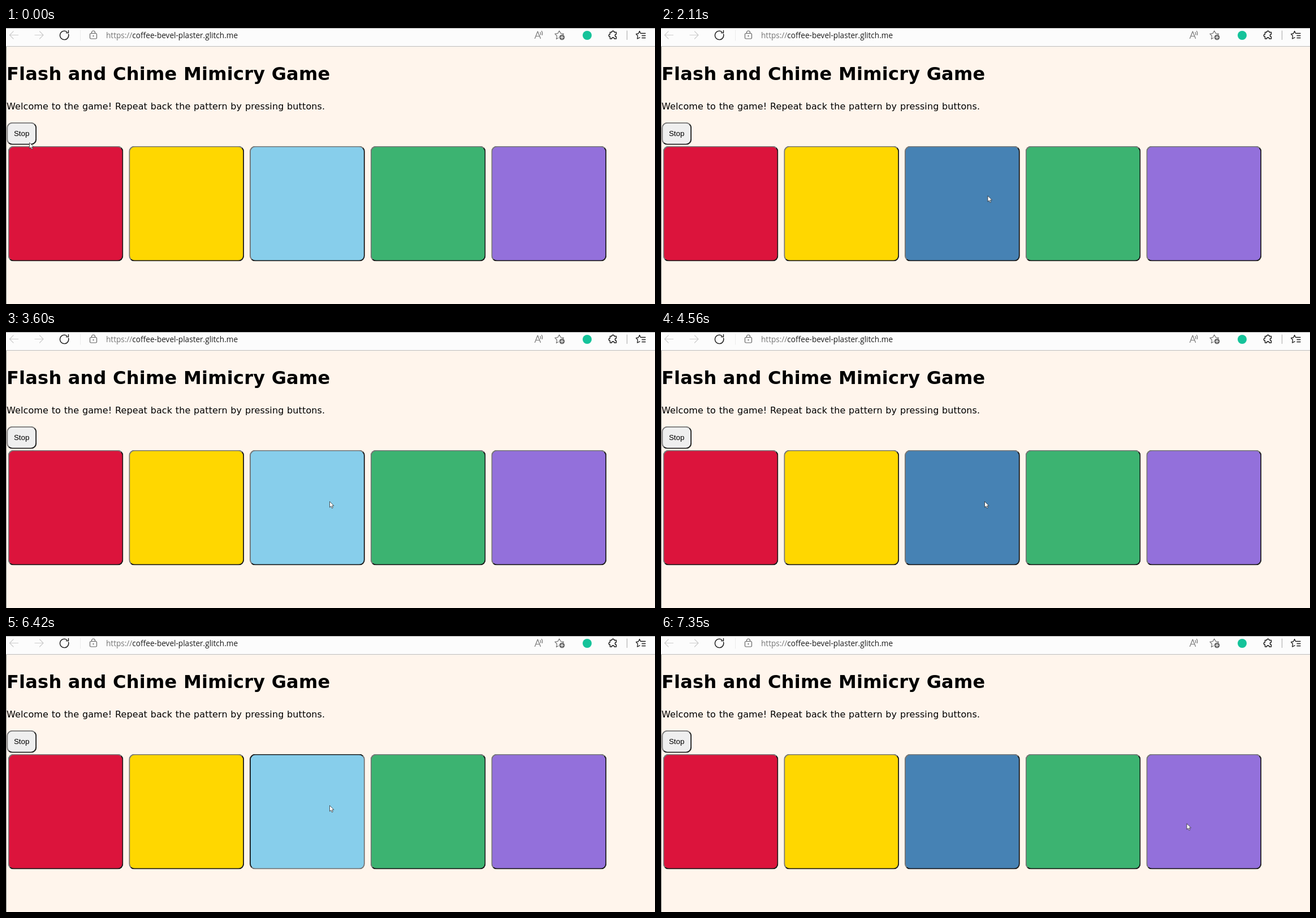
An HTML page for the animation above (8 s loop, 1148 by 488 pixels).

```html
<!DOCTYPE html>
<html lang="en">
<head>
<meta charset="utf-8">
<title>Flash and Chime Mimicry Game</title>
<style>
  html, body { margin: 0; width: 100%; height: 100%; overflow: hidden; }
  body { position: relative; background: #fff5ec; font-family: "DejaVu Sans", sans-serif; color: #000; }
  body > * { position: absolute; box-sizing: border-box; margin: 0; white-space: nowrap; }
  #edge { left: 0; top: 33px; width: 1px; height: 455px; background: #8c8a88; }
  #bar { left: 0; top: 0; }
  #url { left: 177px; top: 3px; font: 13.6px/20px "Open Sans", "Noto Sans", sans-serif; color: #1b1b1b; }
  #url span { color: #757575; }
  h1 { left: 1px; top: 61px; font-size: 32px; line-height: 40px; letter-spacing: .23px; }
  p { left: 1px; top: 129px; font-size: 16px; line-height: 20px; letter-spacing: .11px; word-spacing: .5px; }
  .key { border: 2px solid; border-color: #767676 #1c1c1c #1c1c1c #767676; border-radius: 10px; }
  #stop { left: 0; top: 0; width: 53px; height: 40px; transform: translate(1.2px, 166.7px); background: #efefef;
    text-align: center; font: 13.33px/36px "Liberation Sans", Arial, sans-serif; }
  .pad { left: 0; top: 0; width: 204px; height: 204px; }
  #cursor { left: 0; top: 0; }
</style>
</head>
<body>
<svg id="bar" width="1148" height="33" fill="none" stroke-linecap="round" stroke-linejoin="round">
  <path fill="#fcfcfc" d="M0 0H1148V33H0z"/>
  <path stroke="#a9a9a9" stroke-linecap="butt" d="M0 .5H1148"/>
  <path stroke="#bdbdbd" stroke-linecap="butt" d="M0 32.5H1148"/>
  <g stroke="#cdcdcd" stroke-width="1.2">
    <path d="M21.5 12.5H6.5M13 6L6.5 12.5L13 19"/>
    <path d="M51 12.5H66M59.5 6L66 12.5L59.5 19"/>
  </g>
  <path stroke="#1d1d1d" stroke-width="1.4" d="M110.6 11A7.7 7.7 0 1 1 107.5 6.6M110.5 4.5V8.5H106.5"/>
  <path stroke="#ececec" d="M131.5 4V22"/>
  <g stroke="#636363" stroke-width="1.2">
    <rect x="148.500" y="9.500" width="12" height="9.500" rx="1.8"/>
    <path d="M151.5 9.5V8a3 3 0 0 1 6 0V9.5"/>
  </g>
  <circle cx="154.500" cy="14.200" r="1.100" fill="#636363"/>
  <g stroke="#757575" stroke-width="1.2">
    <path d="M935.5 18.5L940.5 6L945.5 18.5M937.3 14.5H943.7"/>
    <path d="M945 7.5a5 5 0 0 1 .5 4.5M947.5 5.5a8 8 0 0 1 .8 7"/>
    <path d="M977 17.5L973.5 19.5L974.5 14L971 10.3L976 9.6L978.7 5L981.4 9.6L986.5 10.3L985 12"/>
  </g>
  <circle cx="983.500" cy="16.500" r="4.800" fill="#6a6a6a"/>
  <path stroke="#fff" stroke-width="1.1" d="M981 16.5H986M983.5 14V19"/>
  <circle cx="1028" cy="13" r="8" fill="#15c39a"/>
  <path stroke="#1d1d1d" stroke-width="1.4" d="M1068.5 7.5H1071.5a2.2 2.2 0 0 1 4.4 0H1079.5V11a2.2 2.2 0 0 0 0 4.4V19H1075.9a2.2 2.2 0 0 0-4.4 0H1068.5V15.4a2.2 2.2 0 0 1 0-4.4z"/>
  <path stroke="#a8a8a8" d="M1098.5 5V20.5"/>
  <path stroke="#1d1d1d" stroke-width="1.3" d="M1123.5 9.5H1131M1125 13.5H1131M1125 17.5H1131M1122.5 9.5L1120.7 5.5L1118.5 10L1114.5 10.6L1117.5 14L1116.7 19L1121 16.8"/>
</svg>
<div id="url"><span>https://</span>coffee-bevel-plaster.glitch.me</div>
<div id="edge"></div>
<h1>Flash and Chime Mimicry Game</h1>
<p>Welcome to the game! Repeat back the pattern by pressing buttons.</p>
<div id="stop" class="key">Stop</div>
<svg id="cursor" width="11" height="15">
  <path d="M.5 .7V11L2.9 8.9L4.5 12.6L6.3 11.8L4.7 8.2H8z" fill="#fff" stroke="#222" stroke-width=".75" stroke-linejoin="round"/>
</svg>
<script>
const LOOP = 8000;
const cursor = document.getElementById('cursor');

const pads = [
  { idle: '#dc143c' },
  { idle: '#ffd700' },
  { idle: '#4682b4', lit: '#87ceeb' },
  { idle: '#3cb371' },
  { idle: '#9370db', lit: '#dda0dd' }
];

// time, pad, state
const states = [
  [0, 2, 'lit'], [1090, 2, 'idle'],
  [2380, 2, 'down'], [2660, 2, 'idle'],
  [3600, 2, 'lit'], [4560, 2, 'idle'],
  [6420, 2, 'down'], [6540, 2, 'idle'],
  [0, 4, 'idle'], [4990, 4, 'lit'], [5890, 4, 'idle'],
  [7200, 4, 'down'], [7350, 4, 'idle']
];

// time, x, y
const moves = [
  [0, 41, 202], [370, 366, 233], [510, 566, 286], [660, 580, 294],
  [2110, 577.5, 296], [2260, 572, 299], [6660, 609, 299],
  [6810, 750, 309], [6930, 893, 321], [7080, 928.5, 329], [7200, 929.5, 331]
];

function play(el, steps) {
  const frames = steps.map(([t, style]) => ({ offset: t / LOOP, easing: 'step-end', ...style }));
  frames.push({ ...frames[frames.length - 1], offset: 1 });
  el.animate(frames, { duration: LOOP, iterations: Infinity });
}

function look(pad, state) {
  const [a, b] = state === 'down' ? ['#1c1c1c', '#767676'] : ['#767676', '#1c1c1c'];
  return {
    backgroundColor: state === 'idle' ? pad.idle : pad.lit,
    borderTopColor: a, borderLeftColor: a, borderRightColor: b, borderBottomColor: b
  };
}

pads.forEach((pad, i) => {
  const el = document.createElement('div');
  el.className = 'key pad';
  el.style.transform = `translate(${3.5 + 213.7 * i}px, 208.6px)`;
  el.style.background = pad.idle;
  document.body.insertBefore(el, cursor);
  const steps = states.filter(s => s[1] === i).map(([t, , s]) => [t, look(pad, s)]);
  if (steps.length) play(el, steps);
});

play(cursor, moves.map(([t, x, y]) => [t, { transform: `translate(${x}px, ${y}px)` }]));
</script>
</body>
</html>
```
